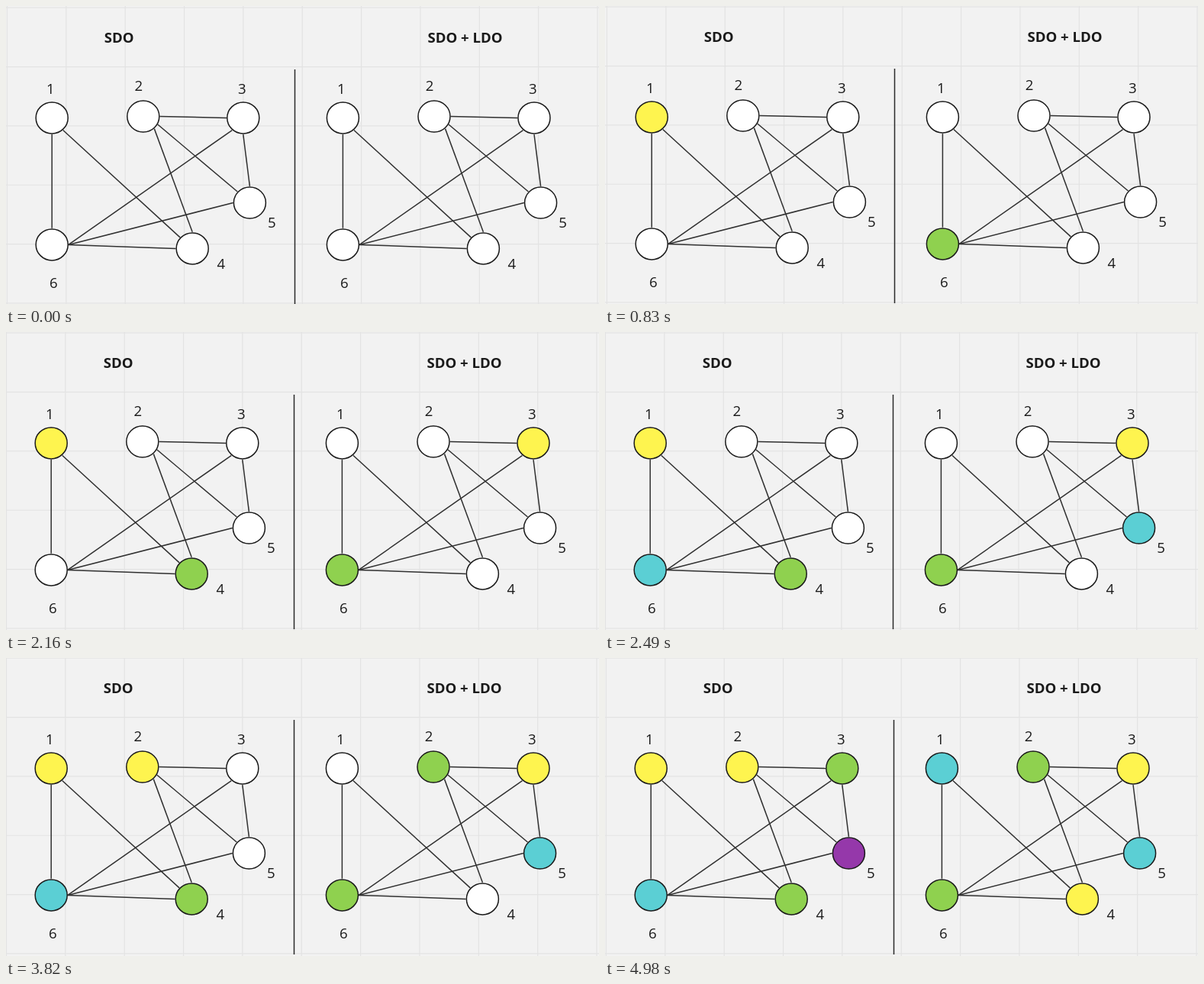
Write an HTML page that moves like this. It is 777x390 px and loops after 5.81 s.

```html
<!DOCTYPE html>
<html lang="en">
<head>
<meta charset="utf-8">
<title>Graph colouring</title>
<style>
html, body { margin: 0; width: 100%; height: 100%; overflow: hidden; background: #f2f2f2; }
svg { display: block; }
text { font: 18.6px "Open Sans", "Noto Sans", sans-serif; fill: #1a1a1a; text-anchor: middle; }
.title { font-weight: 700; }
.grid { stroke: #e3e3e3; stroke-width: 1.2; }
.edge { stroke: #303030; stroke-width: 1.5; }
.rule { stroke: #2b2b2b; stroke-width: 1.5; }
.node { fill: #fff; stroke: #1a1a1a; stroke-width: 1.5; animation: 5810ms step-end infinite; }
#board { animation: drift 5810ms step-end infinite; }
@keyframes drift {
  0% { transform: translate(0, 0); }
  14.2857% { transform: translate(1px, -1px); }
  28.5714% { transform: translate(-1px, -1px); }
  57.1428% { transform: translate(-1px, -2px); }
  85.7142%, 100% { transform: translate(0, -2px); }
}
</style>
</head>
<body>
<svg width="777" height="390" viewBox="0 0 777 390"><g id="board"></g></svg>
<script>
const board = document.getElementById('board');
const yellow = '#fef44f', green = '#8fd14f', cyan = '#5bcfd4', purple = '#9538aa';
const pitch = 77.35, steps = 7;

// node centre and label offset
const nodes = {
  1: { x: 60.2, y: 146.4, dx: -2, dy: -31 },
  2: { x: 179.8, y: 144.5, dx: -6, dy: -34 },
  3: { x: 310.8, y: 146.4, dx: -1.6, dy: -31 },
  4: { x: 244.2, y: 317.4, dx: 37.5, dy: 26.5 },
  5: { x: 319.4, y: 257.5, dx: 29, dy: 32 },
  6: { x: 60.2, y: 312.4, dx: 2, dy: 56.5 },
};

// each edge joins two nodes at a named port, given as an angle in degrees
const ports = { E: 0, ESE: 29, SE: 48, S: 90, SW: 132, W: 180, NW: 222, N: 270 };
const edges = '1S-6N 1SE-4NW 2E-3W 2ESE-5NW 2SE-4N 3SW-6E 3S-5N 5W-6E 6E-4W'
  .split(' ').map(e => e.split('-'));

const graphs = [
  { x: 0, title: 'SDO', titleX: 148.2, order: '146235', palette: [yellow, green, cyan, purple] },
  { x: 381.2, title: 'SDO + LDO', titleX: 601.5, order: '635241', palette: [green, yellow, cyan] },
];

function add(parent, tag, attrs, text) {
  const el = document.createElementNS('http://www.w3.org/2000/svg', tag);
  for (const key in attrs) el.setAttribute(key, attrs[key]);
  if (text) el.textContent = text;
  return parent.appendChild(el);
}

function line(parent, cls, [x1, y1], [x2, y2]) {
  add(parent, 'line', { class: cls, x1, y1, x2, y2 });
}

function portPoint(end) {
  const { x, y } = nodes[end[0]];
  const a = ports[end.slice(1)] * Math.PI / 180;
  return [x + 21.7 * Math.cos(a), y + 21.7 * Math.sin(a)];
}

// greedy colouring: first palette colour no coloured neighbour has
function colourNodes(order, palette) {
  const colours = {};
  for (const id of order) {
    const taken = edges.map(([a, b]) => a[0] === id ? b[0] : b[0] === id ? a[0] : '')
      .map(other => colours[other]);
    colours[id] = palette.find(c => !taken.includes(c));
  }
  return colours;
}

const style = document.head.appendChild(document.createElement('style'));
for (let i = 1; i < steps; i++) {
  const at = (100 * i / steps - 0.00005).toFixed(4);
  style.textContent += `@keyframes step${i} { 0% { fill: #fff; } ${at}%, 100% { fill: var(--c); } }\n`;
}

for (let i = 0; i <= 10; i++) {
  const at = i * pitch;
  line(board, 'grid', [1.5 + at, -5], [1.5 + at, 400]);
  line(board, 'grid', [-5, 2.2 + at], [785, 2.2 + at]);
}
line(board, 'rule', [378.5, 83], [378.5, 390]);

for (const { x: left, title, titleX, order, palette } of graphs) {
  add(board, 'text', { class: 'title', x: titleX, y: 48 }, title);
  const g = add(board, 'g', { transform: `translate(${left} 0)` });
  const colours = colourNodes(order, palette);
  for (const [a, b] of edges) line(g, 'edge', portPoint(a), portPoint(b));
  [...order].forEach((id, i) => {
    const { x, y, dx, dy } = nodes[id];
    add(g, 'ellipse', {
      class: 'node', cx: x, cy: y, rx: 21, ry: 20.5,
      style: `--c:${colours[id]};animation-name:step${i + 1}`,
    });
    add(g, 'text', { x: x + dx, y: y + dy }, id);
  });
}
</script>
</body>
</html>
```
